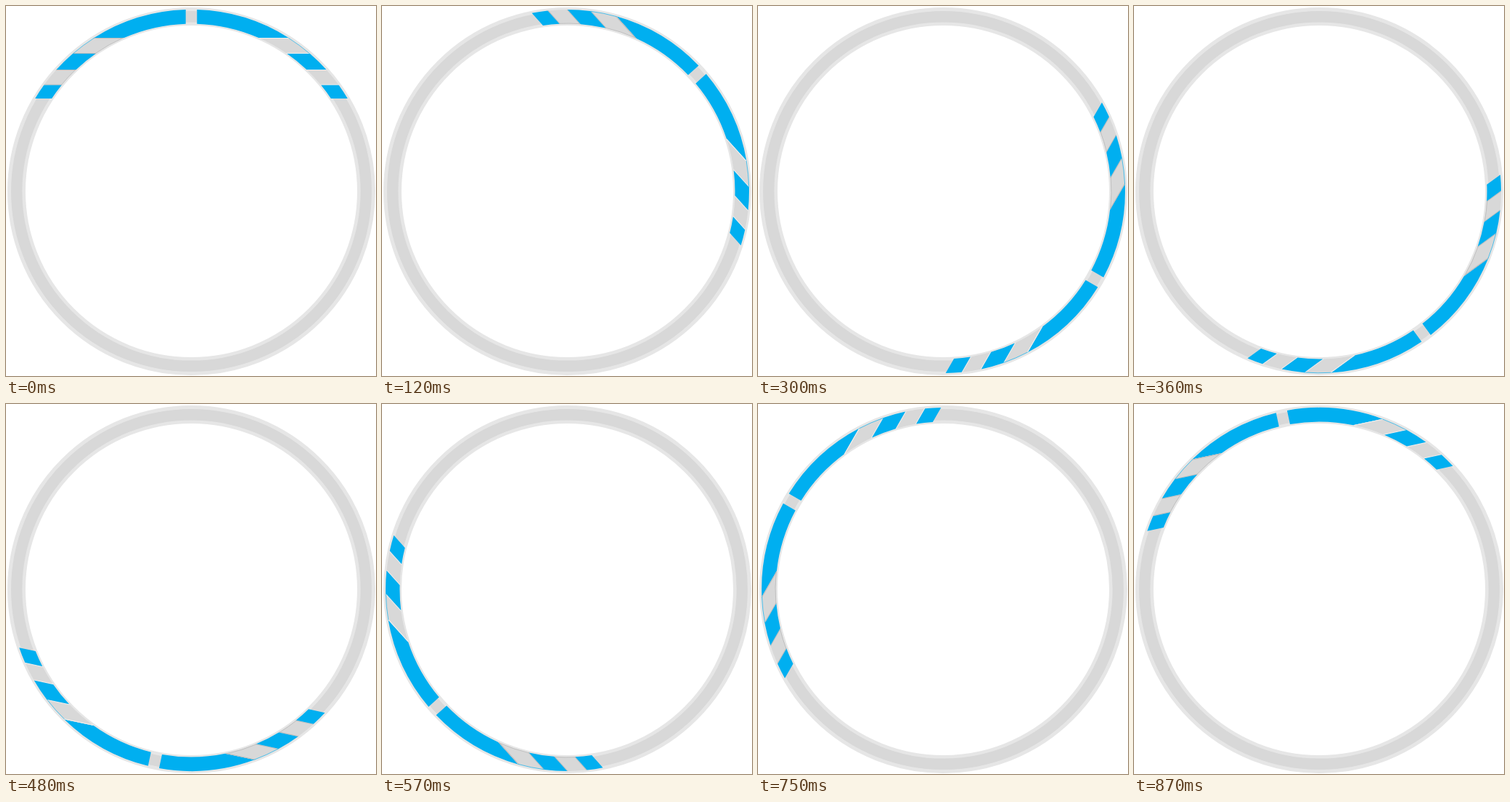
An HTML page for the animation above (900 ms loop, 512x512 px).

```html
<!DOCTYPE html>
<html lang="en">
<head>
<meta charset="utf-8">
<title>Ring spinner</title>
<style>
  html, body { margin: 0; width: 100%; height: 100%; overflow: hidden; background: #fff; }
  svg { display: block; width: 100%; height: 100%; }
</style>
</head>
<body>
<svg viewBox="0 0 512 512">
  <g transform="translate(256.5 256.5)" fill="none">
    <circle r="242" stroke="#e6e6e6" stroke-width="25"/>
    <circle r="241.8" stroke="#d8d8d8" stroke-width="15.4"/>
    <g id="rotor"></g>
  </g>
</svg>
<script>
const BLUE = '#00aff0', GREY = '#d8d8d8';
const OUTER = 251.5, INNER = 232;
const LOOP = 900, STEP = 30, TURN = 12;
const rotor = document.getElementById('rotor');

const across = (r, y) => Math.sqrt(r * r - y * y);
const pt = (x, y) => x.toFixed(2) + ' ' + y.toFixed(2);

function add(d, attrs) {
  const p = document.createElementNS('http://www.w3.org/2000/svg', 'path');
  p.setAttribute('d', d);
  for (const k in attrs) p.setAttribute(k, attrs[k]);
  rotor.appendChild(p);
}

// Arc of radius r on one side (-1 left, 1 right) between two heights
function arc(side, r, from, to) {
  const sweep = (side > 0) === (to > from) ? 1 : 0;
  return `${pt(side * across(r, from), from)}A${r} ${r} 0 0 ${sweep} ${pt(side * across(r, to), to)}`;
}

// Slice of the ring cut by two horizontal lines
function slice(side, top, bottom) {
  return `M${arc(side, OUTER, top, bottom)}L${arc(side, INNER, bottom, top)}Z`;
}

function cap(side) {
  const gap = 7.8, end = -212.5;
  const top = r => -across(r, gap);
  return `M${arc(side, OUTER, top(OUTER), end)}L${arc(side, INNER, end, top(INNER))}Z`;
}

function edge(side, y) {
  return `M${pt(side * across(OUTER, y), y)}L${pt(side * across(INNER, y), y)}`;
}

for (const side of [-1, 1]) {
  const line = side < 0 ? '#bcbcbc' : '#efefef';
  add(cap(side), { fill: BLUE });
  for (const [top, bottom] of [[-212.5, -190.5], [-168.5, -147]]) {
    add(slice(side, top, bottom), { fill: GREY });
    add(edge(side, top + .5) + edge(side, bottom - .5), { stroke: line, 'stroke-width': 1 });
    if (side < 0) {
      add('M' + arc(side, INNER + .5, top, bottom), { stroke: line, 'stroke-width': .8 });
    }
  }
  add('M' + arc(side, OUTER - .2, -212.5, -190.5), { stroke: BLUE, 'stroke-width': .6 });
  add(slice(side, -190.5, -168.5), { fill: BLUE });
  add(slice(side, -147, -128.5), { fill: BLUE });
}

function draw(t) {
  rotor.setAttribute('transform', `rotate(${Math.floor((t % LOOP) / STEP) * TURN})`);
}

const start = performance.now();
function tick() {
  draw(performance.now() - start);
  requestAnimationFrame(tick);
}
tick();
</script>
</body>
</html>
```
